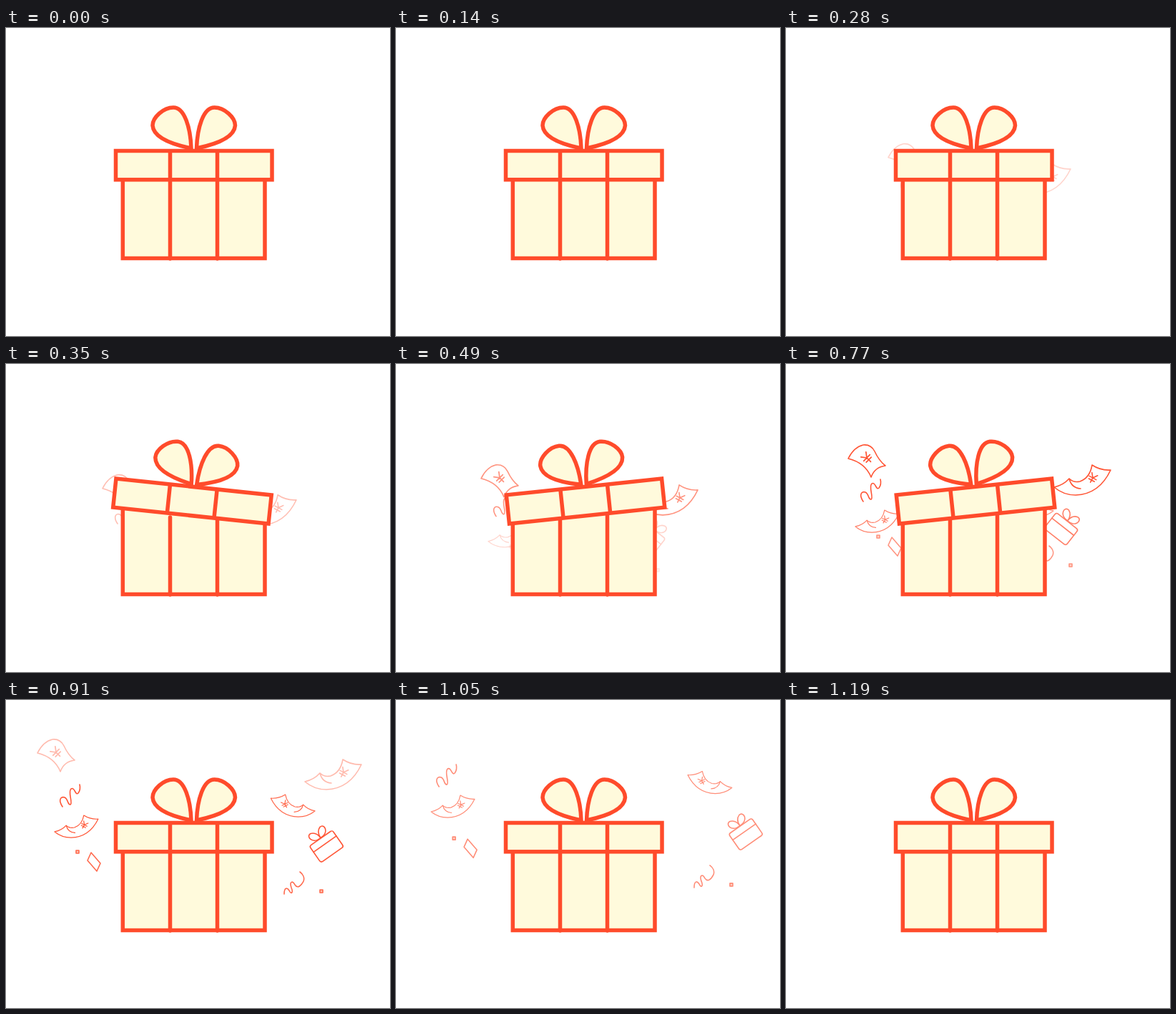
Write an HTML page that moves like this. It is 537x430 px and loops after 1.26 s.

```html
<!DOCTYPE html>
<html lang="en">
<head>
<meta charset="utf-8">
<title>Gift box</title>
<style>
  html, body { margin: 0; width: 100%; height: 100%; overflow: hidden; background: #fff; }
  svg { display: block; width: 100%; height: 100%; }
  .box { fill: #fffadc; stroke: #ff4b2b; stroke-width: 5.5; }
  .line { fill: none; }
  #bits { fill: none; stroke: #ff5535; stroke-width: 1.6; stroke-linejoin: round; stroke-linecap: round; }
  #bits path, #bits rect { vector-effect: non-scaling-stroke; }
  .dot { fill: #ffb9a8; }
</style>
</head>
<body>
<svg viewBox="0 0 537 430">
  <defs>
    <path id="yen" d="M-4.5 -6L0 0L4.5 -6M0 0V7M-5.5 0H5.5M-4.5 3.5H4.5"/>
    <!-- curled banknote, tip at the top right -->
    <g id="note">
      <path d="M53 0Q65 8 79 7Q63 41 30 42Q13 42 0 31Q13 28 21 19Q24 32 37 33M53 0Q50 18 36 23Q27 25 21 19"/>
      <use href="#yen" transform="translate(54 18) rotate(28)"/>
    </g>
    <path id="loop" d="M259 168C258 140 250 111 234 111C220 111 205 125 205 136C206 152 230 162 259 168Z"/>
  </defs>

  <!-- every piece is drawn where it hangs in the air -->
  <g id="bits">
    <g id="noteA">
      <path d="M44 74Q52 58 65 55Q76 54 81 64Q87 77 96 84Q81 86 76 100Q68 80 44 74Z"/>
      <use href="#yen" transform="translate(70 73) rotate(-45) scale(1.1)"/>
    </g>
    <g id="noteB"><use href="#note" x="418" y="83"/></g>
    <g id="noteC"><use href="#note" transform="translate(68 161) scale(.77 .74)"/></g>
    <g id="noteD"><use href="#note" transform="translate(432 132) scale(-.78 .74)"/></g>
    <g id="curlL"><path d="M79 149C73 140 76 134 82 136C87 138 86 147 90 146C94 144 86 128 91 124C96 121 97 134 101 130C104 126 104 122 103 118"/></g>
    <g id="curlR"><path d="M389 271C389 262 393 261 396 266C399 272 402 269 399 262C396 253 401 252 404 258C408 264 413 259 416 253C418 248 415 243 411 240"/></g>
    <g id="gem"><path d="M119 213L132 228L127 239L114 224Z"/></g>
    <g id="dotL"><rect class="dot" x="98" y="210" width="4" height="4"/></g>
    <g id="dotR"><rect class="dot" x="439" y="265" width="4" height="4"/></g>
    <g id="gift">
      <g id="parcel">
        <rect x="-19.5" y="-13.5" width="39" height="28" rx="3"/>
        <path d="M-19.5 -3.5H19.5M0 -14C-15 -13 -16 -28 -8 -27C-2 -25 0 -19 0 -14C15 -13 16 -28 8 -27C2 -25 0 -19 0 -14"/>
      </g>
    </g>
  </g>

  <g class="box">
    <path d="M163.3 200V321.5H362V200"/>
    <path class="line" stroke-linecap="round" d="M229.5 214V322M295.5 210V322"/>
    <g id="lid">
      <use href="#loop"/>
      <use href="#loop" transform="translate(525.5 0) scale(-1 1)"/>
      <rect x="153.5" y="171.5" width="218.5" height="40.3"/>
      <path class="line" d="M229.5 171.5V212M295.5 171.5V212"/>
    </g>
  </g>
</svg>
<script>
const STEP = 70, COUNT = 18;
const BURST = 11, HANG = 13;

// dx, dy: the jump out of the box; from, to: the steps of its life
const pieces = [
  { id: 'noteA', dx: -43, dy: -58, from: 2, to: 14.2 },
  { id: 'noteB', dx: 43, dy: -58, from: 2, to: 14.2 },
  { id: 'noteC', dx: -29, dy: -43, from: 5, to: 17 },
  { id: 'noteD', dx: 58, dy: -50, from: 6, to: 17 },
  { id: 'curlL', dx: -29, dy: -43, from: 2, to: 17 },
  { id: 'curlR', dx: 43, dy: -14, from: 6, to: 17 },
  { id: 'gem', dx: -29, dy: -29, from: 6, to: 17 },
  { id: 'dotL', dx: -29, dy: -29, from: 6, to: 17 },
  { id: 'dotR', dx: 43, dy: -14, from: 6, to: 17 },
  { id: 'gift', dx: 63, dy: -26, from: 5, to: 17 }
];

const byId = id => document.getElementById(id);
const clamp = (v, lo, hi) => Math.min(hi, Math.max(lo, v));
const place = (id, transform) => byId(id).setAttribute('transform', transform);

function draw(step) {
  const tilt = step < HANG ? 6 * Math.sin(step * Math.PI / 2) : 0;
  place('lid', `rotate(${tilt} 262.5 170)`);

  // slow creep out of the box, then a quick jump that overshoots a little
  const creep = Math.max(0, BURST - step);
  const jump = clamp((HANG - step) / (HANG - BURST), -.65, 1);
  for (const { id, dx, dy, from, to } of pieces) {
    const x = -dx * jump - Math.sign(dx) * 8 * creep;
    const y = -dy * (jump + .12 * creep);
    place(id, `translate(${x} ${y})`);
    byId(id).setAttribute('opacity', clamp(Math.min((step - from) / 8, (to - step) / 3), 0, 1));
  }
  place('parcel', `translate(448 204) rotate(${73 * Math.max(0, jump) - 35})`);
}

function tick() {
  draw(Math.floor(performance.now() / STEP) % COUNT);
  requestAnimationFrame(tick);
}
tick();
</script>
</body>
</html>
```
